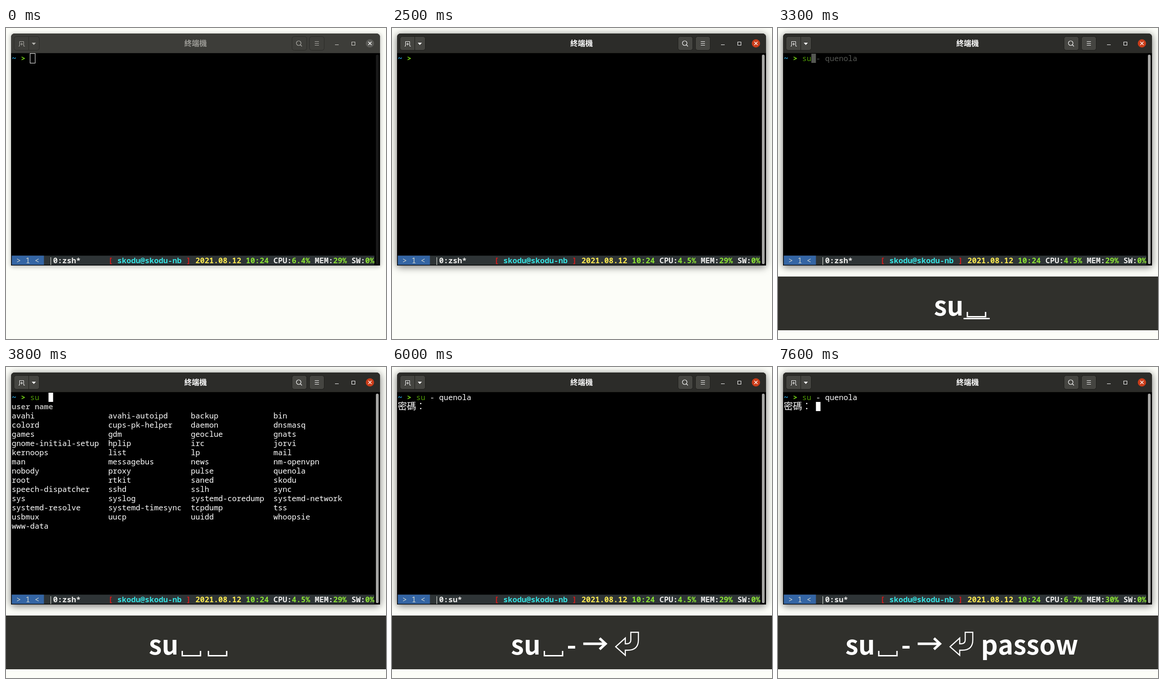
Recreate the animation shown at these times as an HTML page with a canvas. Size 827x677 px, loop 8000 ms.

```html
<!DOCTYPE html>
<html lang="zh-Hant">
<head>
<meta charset="utf-8">
<title>終端機</title>
<style>
html, body { margin: 0; width: 100%; height: 100%; overflow: hidden; background: #fcfdf8; }
canvas { display: block; }
</style>
</head>
<body>
<canvas id="stage" width="827" height="677"></canvas>
<script>
const ctx = document.getElementById('stage').getContext('2d');
const LOOP = 8000, STEP = 100;
const CELL_W = 9.99, CELL_H = 19.98, LEFT = 12.6, TOP = 56, STATUS_ROW = 22, COLUMNS = 79;
const MONO = '16.65px "Noto Sans Mono", monospace';
const CJK = '"Noto Sans CJK TC", "Noto Sans CJK JP", sans-serif';
const KEY_SIZE = 57, KEY_BASE = 625.5, KEY_CENTER = 400;
const WHITE = '#fff', LIGHT = '#eeeeec', GREEN = '#8ae234', DIM = '#555753';
const COMMAND = 'su - quenola';

const users = `avahi avahi-autoipd backup bin colord cups-pk-helper daemon dnsmasq
games gdm geoclue gnats gnome-initial-setup hplip irc jorvi kernoops list lp mail
man messagebus news nm-openvpn nobody proxy pulse quenola root rtkit saned skodu
speech-dispatcher sshd sslh sync sys syslog systemd-coredump systemd-network
systemd-resolve systemd-timesync tcpdump tss usbmux uucp uuidd whoopsie www-data`.split(/\s+/);
const userColumns = [0, 21, 39, 57];

const options = [
  ['--command', '-c', 'pass command to shell'],
  ['--fast', '-f', 'pass -f to shell'],
  ['--help', '', 'display help information'],
  ['--login', '-l  -', 'use a login shell'],
  ['--preserve-environment', '-p  -m', "don't reset environment"],
  ['--session-command', '', "pass command to shell and don't create a n"],
  ['--shell', '-s', 'run the specified shell'],
  ['--version', '', 'display version information'],
];

// [time, typed text, panel below the prompt]
const shell = [
  [0, ''], [3200, 's'], [3300, 'su'], [3500, 'su '], [3600, 'su ', 'users'],
  [3800, 'su  ', 'users'], [4200, 'su ', 'users'], [4400, 'su -', 'options'],
  [4800, COMMAND], [4900, COMMAND, 'password'],
];

// [time, keys shown, last key underlined]
const ENTER = 'su␣- → ⏎';
const keys = [
  [0, ''], [3100, 's', 1], [3200, 'su', 1], [3300, 'su␣', 1], [3500, 'su␣␣', 1],
  [3800, 'su␣␣'], [4000, 'su␣'], [4300, 'su␣-', 1], [4600, 'su␣- →', 1],
  [4900, ENTER, 1], [5200, ENTER], [6400, ENTER + ' p', 1], [6500, ENTER + ' pa', 1],
  [6700, ENTER + ' pas', 1], [6800, ENTER + ' pass', 1], [7100, ENTER + ' passo', 1],
  [7300, ENTER + ' passo'], [7400, ENTER + ' passow', 1], [7600, ENTER + ' passow'],
];

const pointer = [[1700, 330, 62], [1800, 311, 34], [1900, 305, 26], [2200]];
const load = [[0, '6.4%', '29%'], [1200, '4.5%', '29%'], [6100, '6.7%', '30%']];

// Symbol outlines relative to the left edge of a key cell: [path, line width]
const symbols = {
  '␣': [new Path2D('M8.3 618V628.5H48V618'), 3],
  '→': [new Path2D('M2 602.5H51M37.5 590.5L50.5 602.5L37.5 614.5'), 5.5],
  '⏎': [new Path2D('M2.5 609L23.5 590V602.5H27Q35.5 602.5 35.5 594V577.5H52V594Q52 616.5 29 616.5H23.5V627.5Z'), 2.4],
};

const at = (track, t) => track.filter(entry => entry[0] <= t).pop() || [];

function rect(x, y, w, h, color) {
  ctx.fillStyle = color;
  ctx.fillRect(x, y, w, h);
}

function rounded(x, y, w, h, radius, fill, edge) {
  const box = new Path2D();
  box.roundRect(x, y, w, h, radius);
  ctx.fillStyle = fill;
  ctx.fill(box);
  if (edge) stroke(box, edge);
}

function stroke(path, color, width = 1) {
  ctx.strokeStyle = color;
  ctx.lineWidth = width;
  ctx.stroke(path);
}

const line = (d, color, width) => stroke(new Path2D(d), color, width);

function put(col, row, text, color = WHITE, bold = false) {
  ctx.font = (bold ? 'bold ' : '') + MONO;
  ctx.fillStyle = color;
  ctx.fillText(text, LEFT + col * CELL_W, TOP + row * CELL_H + 16);
}

// Only the shadow lands on the stage; its caster stays far to the left.
function shadow(alpha, dy, blur, spread) {
  const away = 2000;
  ctx.save();
  ctx.shadowColor = `rgba(0,0,0,${alpha})`;
  ctx.shadowBlur = blur;
  ctx.shadowOffsetX = away;
  ctx.shadowOffsetY = dy;
  rounded(11 - spread - away, 12 - spread, 803 + 2 * spread, 505 + 2 * spread, 8, '#000');
  ctx.restore();
}

function drawHeader(active) {
  const icon = active ? WHITE : '#b4b3ae', edge = active ? '#1d1d1a' : '#2a2a27';
  const face = active ? '#454541' : '#3e3e3a';
  rounded(11, 12, 803, 43, [8, 8, 0, 0], active ? '#2c2c29' : '#3d3d39');
  rect(11, 54, 803, 1, edge);
  for (const [x, w] of [[17.5, 55], [622.5, 32], [660.5, 32]])
    rounded(x, 18.5, w, 30, 5, face, edge);
  line('M49.5 18V49', edge);
  line('M27.5 39.5H29.5V29.5H38.5V39.5H41M34 32V38M31 35H37', icon);
  ctx.fillStyle = icon;
  ctx.fill(new Path2D('M56 32H65L60.5 37Z'));
  line('M642 33A5 5 0 1 1 632 33A5 5 0 1 1 642 33M641 37L644 40', icon, 1.2);
  line('M672 29.5H681M672 33.5H681M672 37.5H681', icon);
  line('M716 36.5H724M752.5 30.5H759.5V37.5H752.5Z', active ? WHITE : '#d4d3ce', 1.1);
  rounded(783, 24.5, 18, 18, 9, active ? '#cb3d1a' : '#5a5a56');
  line('M788.5 30L795.5 37M795.5 30L788.5 37', WHITE, 1.4);
  ctx.font = 'bold 16.4px ' + CJK;
  ctx.fillStyle = active ? WHITE : '#9b9a95';
  ctx.textAlign = 'center';
  ctx.fillText('終端機', 412.5, 39);
  ctx.textAlign = 'left';
  rounded(805, 58, 6, 456, 3, active ? '#a5a5a3' : '#191919');
}

function drawWindow(t) {
  const focus = Math.min(1, Math.max(0, (t - 1900) / 200));
  shadow(0.22 * (1 - focus), 2, 9, 2);
  shadow(0.5 * focus, 3, 16, 1);
  rounded(11, 12, 803, 505, [8, 8, 0, 0], '#000');
  drawHeader(false);
  ctx.globalAlpha = focus;
  drawHeader(true);
  ctx.globalAlpha = 1;
}

function drawCursor(t, col, row, hint) {
  const x = LEFT + col * CELL_W, y = TOP + row * CELL_H;
  if (t < 1900) {
    ctx.strokeStyle = WHITE;
    ctx.lineWidth = 1;
    ctx.strokeRect(x - 0.1, y - 0.5, 11, 21);
  } else if (!(t >= 2500 && t < 3100) && !(t >= 5500 && t < 6100)) {
    rect(x, y, CELL_W, CELL_H, hint ? DIM : WHITE);
    put(col, row, hint.charAt(0), '#000');
  }
}

function drawShell(t) {
  const [, typed, panel] = at(shell, t);
  const hint = typed && COMMAND.startsWith(typed) ? COMMAND.slice(typed.length) : '';
  put(0, 0, '~', '#2bb0ee', true);
  put(2, 0, '>', '#73d216', true);
  put(4, 0, typed.slice(0, 2), '#4e9a06');
  put(6, 0, typed.slice(2));
  put(4 + typed.length, 0, hint, DIM);

  if (panel === 'password') {
    ctx.font = '20px ' + CJK;
    ctx.fillStyle = WHITE;
    ctx.fillText('密碼：', LEFT, TOP + CELL_H + 17);
    drawCursor(t, 7, 1, '');
    return;
  }
  if (panel === 'users') {
    put(0, 1, 'user name', '#adadab', true);
    users.forEach((name, i) => put(userColumns[i % 4], 2 + (i >> 2), name));
  } else if (panel === 'options') {
    put(0, 1, 'option', '#adadab', true);
    options.forEach(([long, short, about], i) => {
      put(0, 2 + i, long);
      put(24, 2 + i, short);
      put(32, 2 + i, '-- ' + about);
    });
  }
  drawCursor(t, 4 + typed.length, 0, hint);
}

function drawStatus(t) {
  const [, cpu, mem] = at(load, t);
  const y = TOP + STATUS_ROW * CELL_H;
  rect(LEFT, y, COLUMNS * CELL_W, CELL_H, '#2e3436');
  rect(LEFT, y, 7 * CELL_W, CELL_H, '#3465a4');
  put(1, STATUS_ROW, '> 1 <', '#d3d7cf');
  put(8, STATUS_ROW, '|', '#d3d7cf');
  const parts = [
    [9, t < 6000 ? '0:zsh*' : '0:su*', LIGHT], [21, '[', '#d71a1a'],
    [23, 'skodu@skodu-nb', '#34e2e2'], [38, ']', '#d71a1a'],
    [40, '2021.08.12', '#fce94f'], [51, '10:24', GREEN],
    [57, 'CPU:', LIGHT], [61, cpu, GREEN], [66, 'MEM:', LIGHT], [70, mem, GREEN],
    [74, 'SW:', LIGHT], [77, '0%', GREEN],
  ];
  for (const [col, text, color] of parts) put(col, STATUS_ROW, text, color, true);
}

function drawKeys(t) {
  const [, text, recent] = at(keys, t);
  if (!text) return;
  rect(0, 541, 827, 117, '#30302c');
  ctx.font = `bold ${KEY_SIZE}px ${CJK}`;
  const glyphs = [...text];
  const widths = glyphs.map(g => symbols[g] ? KEY_SIZE : ctx.measureText(g).width);
  let x = KEY_CENTER - widths.reduce((sum, w) => sum + w, 0) / 2;
  glyphs.forEach((glyph, i) => {
    ctx.fillStyle = WHITE;
    if (symbols[glyph]) {
      const [path, width] = symbols[glyph];
      ctx.save();
      ctx.translate(x, 0);
      stroke(path, WHITE, width);
      ctx.restore();
    } else {
      ctx.fillText(glyph, x, KEY_BASE);
    }
    if (recent && i === glyphs.length - 1) rect(x, 631, widths[i], 3, WHITE);
    x += widths[i];
  });
}

function drawPointer(t) {
  const [, x, y] = at(pointer, t);
  if (x === undefined) return;
  ctx.save();
  ctx.translate(x + 0.5, y);
  const arrow = new Path2D('M0 0V15.5L3.6 12.2L6 17.4L8.5 16.2L6.2 11.2H11Z');
  ctx.fillStyle = '#1c1c1c';
  ctx.fill(arrow);
  stroke(arrow, WHITE, 1.2);
  ctx.restore();
}

const start = performance.now();

function frame() {
  const t = Math.floor((performance.now() - start) % LOOP / STEP) * STEP;
  rect(0, 0, 827, 677, '#fcfdf8');
  drawWindow(t);
  drawShell(t);
  drawStatus(t);
  drawKeys(t);
  drawPointer(t);
  requestAnimationFrame(frame);
}

frame();
</script>
</body>
</html>
```
